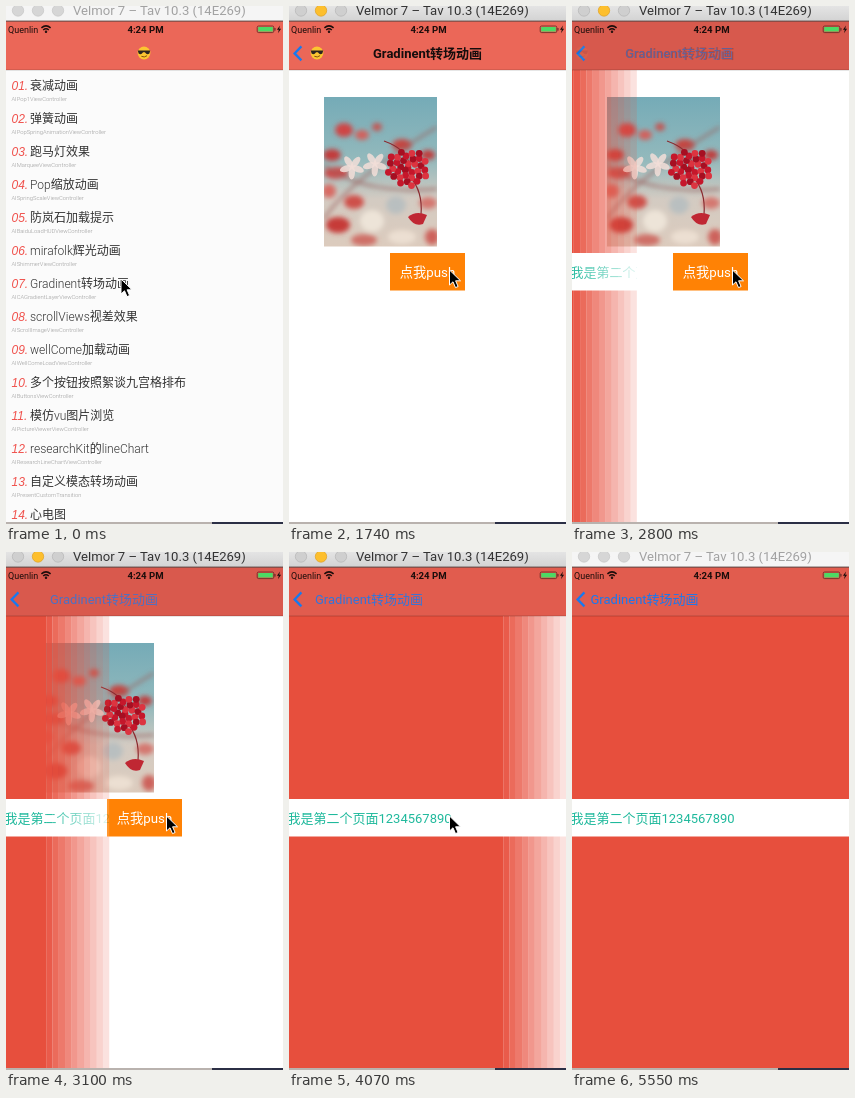
An HTML page for the animation above (5690 ms loop, 277x518 px).

```html
<!DOCTYPE html>
<html lang="zh">
<head>
<meta charset="utf-8">
<title>转场动画</title>
<style>
  html, body { margin: 0; width: 277px; height: 518px; overflow: hidden; background: #fff; }
  svg { display: block; width: 277px; height: 518px; }
  text { font-family: Roboto, "Noto Sans CJK SC", "Noto Sans CJK", sans-serif; white-space: pre; }
  .num { font: italic 12px "Liberation Sans", Arial, sans-serif; fill: #f0524d; }
  .name { font-size: 12px; font-weight: 300; fill: #333; }
  .sub { font-size: 5.8px; font-weight: 300; fill: #999; }
  .nav { font-size: 13px; }
  .status { font-size: 9px; fill: #1c0d0b; }
</style>
</head>
<body>
<svg viewBox="0 0 277 518" xmlns="http://www.w3.org/2000/svg">
  <defs>
    <linearGradient id="sky" x1="0" y1="0" x2="0" y2="1">
      <stop offset="0" stop-color="#75abb7"/>
      <stop offset=".42" stop-color="#93b9bc"/>
      <stop offset=".68" stop-color="#d3cbc2"/>
      <stop offset="1" stop-color="#dccbbd"/>
    </linearGradient>
    <linearGradient id="chrome" x1="0" y1="0" x2="0" y2="1">
      <stop offset="0" stop-color="#e4e4e4"/>
      <stop offset="1" stop-color="#d3d3d3"/>
    </linearGradient>
    <linearGradient id="shade">
      <stop offset="0" stop-opacity="0"/>
      <stop offset="1" stop-opacity=".12"/>
    </linearGradient>
    <filter id="soft" x="-30%" y="-30%" width="160%" height="160%"><feGaussianBlur stdDeviation="2.6"/></filter>
    <clipPath id="frame"><rect width="113" height="149.5"/></clipPath>
    <mask id="wipe" maskUnits="userSpaceOnUse" x="0" y="0" width="277" height="518">
      <g id="edge"><rect x="-700" width="637" height="518" fill="#fff"/></g>
    </mask>
    <g id="emoji">
      <circle r="6.4" fill="#fcc531"/>
      <path d="M-6.2-2.6H6.2L5.4.4Q3 2.4.9-.8H-.9Q-3 2.4-5.4.4Z" fill="#2b2420"/>
      <path d="M-2.6 3.3Q.4 4.9 3 2.7" fill="none" stroke="#80500f" stroke-width="1"/>
    </g>
  </defs>

  <g id="list"><rect y="64" width="277" height="454" fill="#fbfbfb"/></g>
  <rect id="dim" y="64" width="277" height="454" opacity="0"/>

  <g id="page">
    <rect x="-6" y="64" width="6" height="454" fill="url(#shade)"/>
    <rect y="64" width="277" height="454" fill="#fff"/>
    <g id="photo" transform="translate(35 91)" clip-path="url(#frame)">
      <rect width="113" height="150" fill="url(#sky)"/>
      <g id="blur" filter="url(#soft)"></g>
      <g id="berries"></g>
    </g>
    <rect x="101" y="247" width="75" height="37.5" fill="#ff8205"/>
    <text x="138.5" y="270.8" text-anchor="middle" font-size="13.3" fill="#fff">点我push</text>
  </g>

  <g mask="url(#wipe)">
    <rect y="64" width="277" height="454" fill="#e74f3d"/>
    <rect y="247" width="277" height="37.5" fill="#fff"/>
    <text x="-1.5" y="270.6" font-size="13" fill="#1fb99c">我是第二个页面1234567890</text>
  </g>

  <rect id="bar" y="15" width="277" height="49"/>
  <rect id="line" y="63.5" width="277" height="1" opacity=".2"/>
  <text class="status" x="2" y="26.5">Quenlin</text>
  <g fill="none" stroke="#1c0d0b" stroke-width="1.5">
    <path d="M35.4 21.9Q40 17.9 44.6 21.9M37.2 24Q40 21.6 42.8 24"/>
    <circle cx="40" cy="25.7" r=".5"/>
  </g>
  <text class="status" x="139.5" y="26.6" text-anchor="middle" style="font-size:9.6px;font-weight:700">4:24 PM</text>
  <rect x="251.2" y="20" width="16.6" height="6.6" rx="1.4" fill="none" stroke="#5d2b25" stroke-width=".8"/>
  <rect x="252.2" y="21" width="14.6" height="4.6" rx=".6" fill="#4cd964"/>
  <rect x="268.4" y="22" width="1.1" height="2.6" fill="#5d2b25"/>
  <path d="M274 19.4L270.9 23.8H272.8L272 27.2L275.1 22.7H273.2Z" fill="#1c0d0b"/>

  <path id="chevron" d="M12.4 40.4L5.6 47.4L12.4 54.4" fill="none" stroke="#1979ee" stroke-width="2.3"/>
  <text id="title" class="nav" y="52" font-weight="700" fill="#160d0d">Gradinent转场动画</text>
  <text id="back" class="nav" y="52" fill="#1979f0">Gradinent转场动画</text>
  <use id="face" href="#emoji"/>

  <rect id="chrome-bar" width="277" height="15"/>
  <rect y="14.6" width="277" height="1" fill="#5a4442"/>
  <g id="lights" stroke-width=".7"></g>
  <text id="caption" x="67" y="9.2" font-size="13.1">Velmor 7 – Tav 10.3 (14E269)</text>
  <rect y="516" width="206" height="2" fill="#b9b2ae"/>
  <rect x="206" y="516" width="71" height="2" fill="#2b2f45"/>
  <path id="cursor" d="M0 0V15L3.5 11.8L6 17.6L8.6 16.5L6.1 10.8H11Z" fill="#000" stroke="#fff" stroke-width="1"/>
</svg>
<script>
const LOOP = 5690;
const $ = id => document.getElementById(id);

function add(parent, tag, attrs, text) {
  const el = document.createElementNS("http://www.w3.org/2000/svg", tag);
  for (const key in attrs) el.setAttribute(key, attrs[key]);
  if (text) el.textContent = text;
  $(parent).append(el);
  return el;
}

const rows = [
  ["衰减动画", "Pop1View"],
  ["弹簧动画", "PopSpringAnimationView"],
  ["跑马灯效果", "MarqueeView"],
  ["Pop缩放动画", "SpringScaleView"],
  ["防岚石加载提示", "BaiduLoadHUDView"],
  ["mirafolk辉光动画", "ShimmerView"],
  ["Gradinent转场动画", "CAGradientLayerView"],
  ["scrollViews视差效果", "ScrollImageView"],
  ["wellCome加载动画", "WellComeLoadView"],
  ["多个按钮按照絮谈九宫格排布", "ButtonsView"],
  ["模仿vu图片浏览", "PictureViewerView"],
  ["researchKit的lineChart", "ResearchLineChartView"],
  ["自定义模态转场动画", "PresentCustomTransition"],
  ["心电图", ""]
];
rows.forEach(([name, sub], i) => {
  const y = 83.7 + i * 33;
  add("list", "text", { class: "num", x: 5.5, y }, String(i + 1).padStart(2, "0") + ".");
  add("list", "text", { class: "name", x: 24, y }, name);
  const suffix = sub.endsWith("View") ? "Controller" : "";
  if (sub) add("list", "text", { class: "sub", x: 5.5, y: y + 11.4 }, "AI" + sub + suffix);
});

// Soft blossoms: x, y, rx, ry, colour
[
  [20, 33, 9, 7, "#cf4545"], [38, 38, 7, 5, "#d2605b"], [53, 30, 5, 4, "#c4534f"],
  [8, 58, 9, 6, "#c23a3a"], [12, 76, 12, 6, "#cb4a48"], [78, 48, 10, 6, "#c54441"],
  [104, 58, 7, 5, "#bf3c3c"], [5, 94, 7, 7, "#d86b63"], [30, 105, 10, 7, "#ce4f4a"],
  [14, 128, 12, 8, "#c63b39"], [48, 124, 12, 11, "#ede4d8"], [72, 108, 10, 9, "#b9bfc0"],
  [40, 143, 13, 6, "#cf6f67"], [104, 106, 9, 6, "#d4776f"], [78, 140, 14, 7, "#ecdfd2"],
  [108, 140, 7, 8, "#cd625c"]
].forEach(([cx, cy, rx, ry, fill]) => add("blur", "ellipse", { cx, cy, rx, ry, fill }));
add("blur", "path", { d: "M0 122Q24 84 113 30M0 68Q40 98 113 92", fill: "none", stroke: "#9b5e5c", "stroke-width": 2 });

for (const [x, y] of [[28, 70], [51, 67]])
  for (let i = 0; i < 5; i++)
    add("berries", "ellipse", { cx: 6, rx: 6.5, ry: 3.2, fill: "#f2dfd9", opacity: .85,
      transform: `translate(${x} ${y}) rotate(${i * 72 + 20})` });
add("berries", "path", { d: "M60 44Q82 52 85 66M86 80Q99 94 97 118", fill: "none", stroke: "#8b2b30", "stroke-width": 1.2 });
for (let i = 0; i < 34; i++) {
  const a = i * 2.4, r = Math.sqrt(i) * 3.7;
  add("berries", "circle", { cx: 84 + Math.cos(a) * r, cy: 71 + Math.sin(a) * r * .85, r: 3.4,
    fill: ["#c5172b", "#a60f22", "#dc3440"][i % 3] });
}
add("berries", "path", { d: "M84 120Q92 113 103 118L99 127Q90 130 84 120Z", fill: "#c02733" });

// Banded fade along the leading edge of the red page
for (let i = 0; i < 10; i++)
  add("edge", "rect", { x: -63 + i * 6.3, width: 6.35, height: 518, fill: "#fff", opacity: .93 - i * .085 });

const lights = [12, 32, 52].map(cx => add("lights", "circle", { cx, cy: 4.5, r: 5.7 }));

function at(t, keys) {
  if (t <= keys[0][0]) return keys[0][1];
  for (let i = 1; i < keys.length; i++) {
    const [t0, v0] = keys[i - 1], [t1, v1] = keys[i];
    if (t < t1) return v0 + (v1 - v0) * (t - t0) / (t1 - t0);
  }
  return keys[keys.length - 1][1];
}

const red = [[420, 235], [1740, 235], [2270, 211], [3100, 217], [3520, 223], [4070, 225]];
const green = [[420, 103], [1740, 103], [2270, 88], [3520, 90], [4070, 92]];
const blue = [[420, 88], [1740, 88], [2270, 76], [4070, 78]];
const tipX = [[2250, -1], [2380, 11], [3100, 103], [3520, 171], [4070, 277], [4450, 355]];
const titleX = [[1740, 84], [2000, 80], [2380, 69], [2740, 55], [3100, 44], [3520, 34.5], [4070, 26], [4680, 21], [5360, 18.5]];
const titleAlpha = [[1740, 1], [2380, .62], [3000, 0]];
const backAlpha = [[1740, 0], [2380, .25], [3100, .72], [4070, .87], [5360, 1]];
const faceX = [[1740, 28], [2380, 17.5], [2900, 8]];
const faceAlpha = [[1740, 1], [2380, .65], [2850, 0]];
const cursorX = [[1000, 115], [1150, 159.5], [1290, 159.5], [1320, 160.5]];
const cursorY = [[1000, 273], [1150, 265], [1290, 265], [1320, 264]];

const move = (id, x, y = 0) => $(id).setAttribute("transform", `translate(${x.toFixed(2)} ${y.toFixed(2)})`);
const fade = (id, v) => $(id).setAttribute("opacity", v.toFixed(3));
const paint = (el, fill, stroke = "none") => { el.setAttribute("fill", fill); el.setAttribute("stroke", stroke); };

function draw(t) {
  // Critically damped push: 1 = off screen, 0 = settled
  const s = t < 420 ? 0 : (t - 400) * .0152;
  const away = t > 1160 ? 0 : (1 + s) * Math.exp(-s);
  move("list", -83 * (1 - away));
  fade("dim", .1 * (1 - away));
  move("page", (away === 1 ? 290 : 277 * away));
  move("edge", at(t, tipX));

  $("bar").setAttribute("fill", `rgb(${at(t, red)},${at(t, green)},${at(t, blue)})`);
  fade("chevron", 1 - away);
  const x = at(t, titleX);
  move("title", x + 110 * away);
  fade("title", (1 - away) * at(t, titleAlpha));
  move("back", x);
  fade("back", at(t, backAlpha));
  move("face", at(t, faceX) + 110 * away, 47);
  fade("face", at(t, faceAlpha));

  const active = t >= 420 && t < 5550;
  paint($("chrome-bar"), active ? "url(#chrome)" : "#f5f5f5");
  paint($("caption"), active ? "#333" : "#a2a2a2");
  lights.forEach((el, i) => {
    if (active && i === 1) paint(el, "#fdbf2d", "#dfa023");
    else paint(el, active ? "#cfcfcf" : "#d6d6d6", active ? "#b5b5b5" : "#c6c6c6");
  });
  move("cursor", at(t, cursorX), at(t, cursorY));
  fade("cursor", t < 5550 ? 1 : 0);
}

function tick() {
  draw(performance.now() % LOOP);
  requestAnimationFrame(tick);
}
tick();
</script>
</body>
</html>
```
